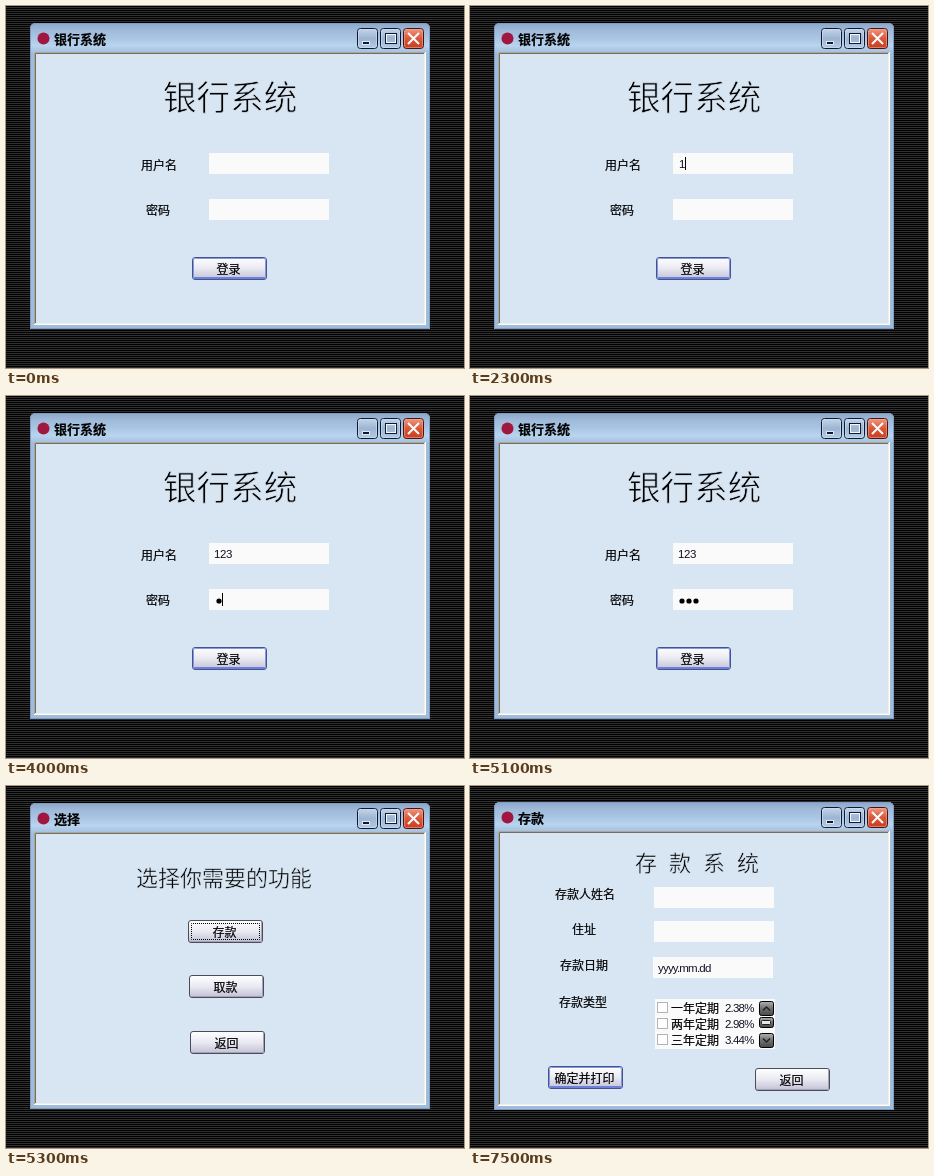
These frames come from a looping animation (458 by 362 pixels, 8000 ms). An HTML page:

```html
<!DOCTYPE html>
<html lang="zh">
<head>
<meta charset="utf-8">
<style>
html, body { margin: 0; width: 100%; height: 100%; overflow: hidden; background: #000; }
svg { display: block; }
text { font: 12px "Noto Sans CJK SC", "Noto Sans CJK", sans-serif; white-space: pre; stroke: #000; stroke-width: .2px; }
.bar { font-size: 13px; font-weight: bold; }
/* a stroke in the panel colour thins the heading strokes */
.big { font-weight: 300; stroke: #d8e5f2; stroke-width: .024em; }
.num { font: 11.5px "Liberation Sans", Arial, sans-serif; fill: #112; stroke: none; letter-spacing: -.4px; }
.tight { letter-spacing: -.8px; }
.mid { text-anchor: middle; }
</style>
</head>
<body>
<svg id="stage" width="458" height="362" viewBox="0 0 458 362"></svg>
<script>
const stage = document.getElementById('stage');

const rect = (x, y, w, h, fill, more = '') =>
  `<rect x="${x}" y="${y}" width="${w}" height="${h}" fill="${fill}" ${more}/>`;
const outline = (x, y, w, h, fill, stroke, r = 0, more = '') =>
  rect(x + .5, y + .5, w - 1, h - 1, fill, `rx="${r}" stroke="${stroke}" ${more}`);
const text = (x, y, s, cls = '', size = 0) =>
  `<text x="${x}" y="${y}" class="${cls}"${size ? ` style="font-size:${size}px"` : ''}>${s}</text>`;
const path = (d, stroke, width = 1) =>
  `<path d="${d}" fill="none" stroke="${stroke}" stroke-width="${width}"/>`;
const field = (x, y) => rect(x, y, 120, 21, '#fafafa');
const caret = (x, y) => rect(x, y, 1, 13, '#000');
const gradient = (id, ...stops) =>
  `<linearGradient id="${id}" x2="0" y2="1">${stops.map((c, i) =>
    `<stop offset="${i / (stops.length - 1)}" stop-color="${c}"/>`).join('')}</linearGradient>`;

const defs = `<defs>
  ${gradient('title', '#8ca6c9', '#a0bada', '#a9c5e4', '#b9d4ee', '#a3bfdf')}
  ${gradient('tool', '#c3d5eb', '#9db5d3', '#b4cbe5')}
  ${gradient('close', '#ee9a85', '#dc5638', '#c83c20')}
  ${gradient('face', '#ffffff', '#e9e9f2', '#c0c0d4')}
  ${gradient('down', '#bcbcd0', '#d8d8e4', '#eeeef6')}
  ${gradient('dark', '#b0b0b0', '#707070', '#484848')}
  <pattern id="lines" width="2" height="2" patternUnits="userSpaceOnUse">
    ${rect(0, 0, 2, 2, '#000')}${rect(0, 1, 2, 1, '#303030')}</pattern>
</defs>`;

function button(x, y, label, { main, focus, pressed } = {}) {
  const shift = pressed ? 1 : 0;
  return outline(x, y, 75, 23, pressed ? 'url(#down)' : 'url(#face)', main ? '#45558c' : '#4c4c56', 2.5) +
    (main ? outline(x + 1, y + 1, 73, 21, 'none', '#8497e6', 2) +
      rect(x + 2, y + 20, 71, 2, '#6c80dc')
      : path(`M${x + 73.5} ${y + 2}v19.5H${x + 2}`, '#a4a4b8')) +
    (focus ? outline(x + 3, y + 3, 69, 17, 'none', '#000', 0,
      'stroke-dasharray="1 1" stroke-dashoffset=".5"') : '') +
    text(x + 36.5 + shift, y + 16.5 + shift, label, 'mid');
}

// The window frame grows by one pixel at top and bottom when `grow` is 1.
function frame(title, grow = 0) {
  const y = 17 - grow, end = 323 + grow, b = y + 5;
  const top = y + 29, low = end - 4;
  return rect(0, 0, 458, 362, 'url(#lines)') +
    `<path d="M24 ${end}V${y + 6}q0-6 6-6H418q6 0 6 6V${end}z" fill="#a0bcdc"/>` +
    `<path d="M24 ${y + 30}V${y + 6}q0-6 6-6H418q6 0 6 6V${y + 30}z" fill="url(#title)"/>` +
    path(`M24.5 ${end - .5}V${y + 6}q0-5.5 5.5-5.5H418q5.5 0 5.5 5.5V${end - .5}z`, '#7f9dc2') +
    rect(28, top, 392, low - top, '#d8e5f2') +
    path(`M28.5 ${low}V${top + .5}H420`, '#aca899') +
    path(`M29.5 ${low - 1}V${top + 1.5}H419`, '#716f64') +
    path(`M28 ${low - .5}H419.5V${top}`, '#fff') +
    path(`M29 ${low - 1.5}H418.5V${top + 1}`, '#f1efe2') +
    `<circle cx="37.5" cy="${y + 15.5}" r="6" fill="#a01840"/>` +
    text(48, y + 20.5, title, 'bar') +
    [351, 374, 397].map((x, i) =>
      outline(x, b, 21, 21, i < 2 ? 'url(#tool)' : 'url(#close)', i < 2 ? '#0e1a30' : '#4c120c', 3) +
      outline(x + 1, b + 1, 19, 19, 'none', i < 2 ? '#d2e0f0' : '#f0a898', 2, 'opacity=".6"')).join('') +
    rect(356, b + 13, 8, 4, '#dfe9f5') + rect(357, b + 14, 6, 2, '#0e1a30') +
    outline(379, b + 5, 12, 11, 'none', '#0e1a30') + outline(380, b + 6, 10, 9, 'none', '#f4f8fc') +
    path(`M402 ${b + 5}l11 11m0-11l-11 11`, '#fff', 2);
}

function login(t) {
  const count = times => times.filter(at => t >= at).length;
  const chars = count([2300, 2600, 3000]);
  const dots = count([4000, 4300, 4700]);
  const inUser = t < 3500, inPass = !inUser && t < 5100;
  const pressed = t >= 5200;
  let s = frame('银行系统') + text(157, 103.5, '银行系统', 'big', 33.6) +
    text(135, 163.5, '用户名') + text(140, 208.5, '密码') +
    field(203, 147) + field(203, 193) +
    text(inUser ? 209 : 208, 162, '123'.slice(0, chars), 'num') +
    button(186, 251, '登录', { main: true, focus: pressed, pressed });
  for (let i = 0; i < dots; i++)
    s += `<circle cx="${(inPass ? 213 : 212) + 7 * i}" cy="205" r="2.6"/>`;
  if (inUser && t >= 1300 && (t < 1800 || chars)) s += caret(209 + 6 * chars, 151);
  if (inPass) s += caret(209 + 7 * dots, 197);
  return s;
}

const menu = () => frame('选择') + text(130, 100, '选择你需要的功能', 'big', 22) +
  button(182, 134, '存款', { focus: true }) +
  button(183, 189, '取款') + button(184, 245, '返回');

function deposit(t) {
  const rows = [['一年定期', '2.38%'], ['两年定期', '2.98%'], ['三年定期', '3.44%']];
  return frame('存款', 1) +
    `<g letter-spacing="12">${text(165, 84.5, '存款系统', 'big', 22)}</g>` +
    text(85, 112.5, '存款人姓名') + text(102, 147.5, '住址') +
    text(90, 183.5, '存款日期') + text(89, 220.5, '存款类型') +
    field(184, 101) + field(184, 135) + field(183, 171) +
    text(188, 186, 'yyyy.mm.dd', 'num tight') +
    rect(185, 213, 120, 50, '#fafafa') +
    rows.map(([name, rate], i) => outline(187, 216 + 16 * i, 11, 11, '#fff', '#b4b4b4') +
      text(201, 226.5 + 16 * i, name) + text(255, 226 + 16 * i, rate, 'num tight')).join('') +
    outline(289, 215, 15, 15, 'url(#dark)', '#000', 2) +
    outline(289, 231, 15, 11, 'url(#dark)', '#000', 2) +
    outline(289, 247, 15, 15, 'url(#dark)', '#000', 2) +
    path('M293 224.5l3.5-3.5 3.5 3.5M293 252.5l3.5 3.5 3.5-3.5', '#222', 1.5) +
    outline(291, 234, 10, 5, '#e8e8e8', '#222', 1) +
    button(78, 280, '确定并打印', { main: true }) + button(285, 282, '返回') +
    (t >= 6600 && t < 7500 ? caret(190, 105) : '');
}

let shown = '';
function draw(now) {
  const t = now % 8000;
  const scene = t < 5300 ? login(t) : t < 6500 ? menu() : deposit(t);
  if (scene !== shown) stage.innerHTML = defs + (shown = scene);
  requestAnimationFrame(draw);
}
draw(0);
</script>
</body>
</html>
```
